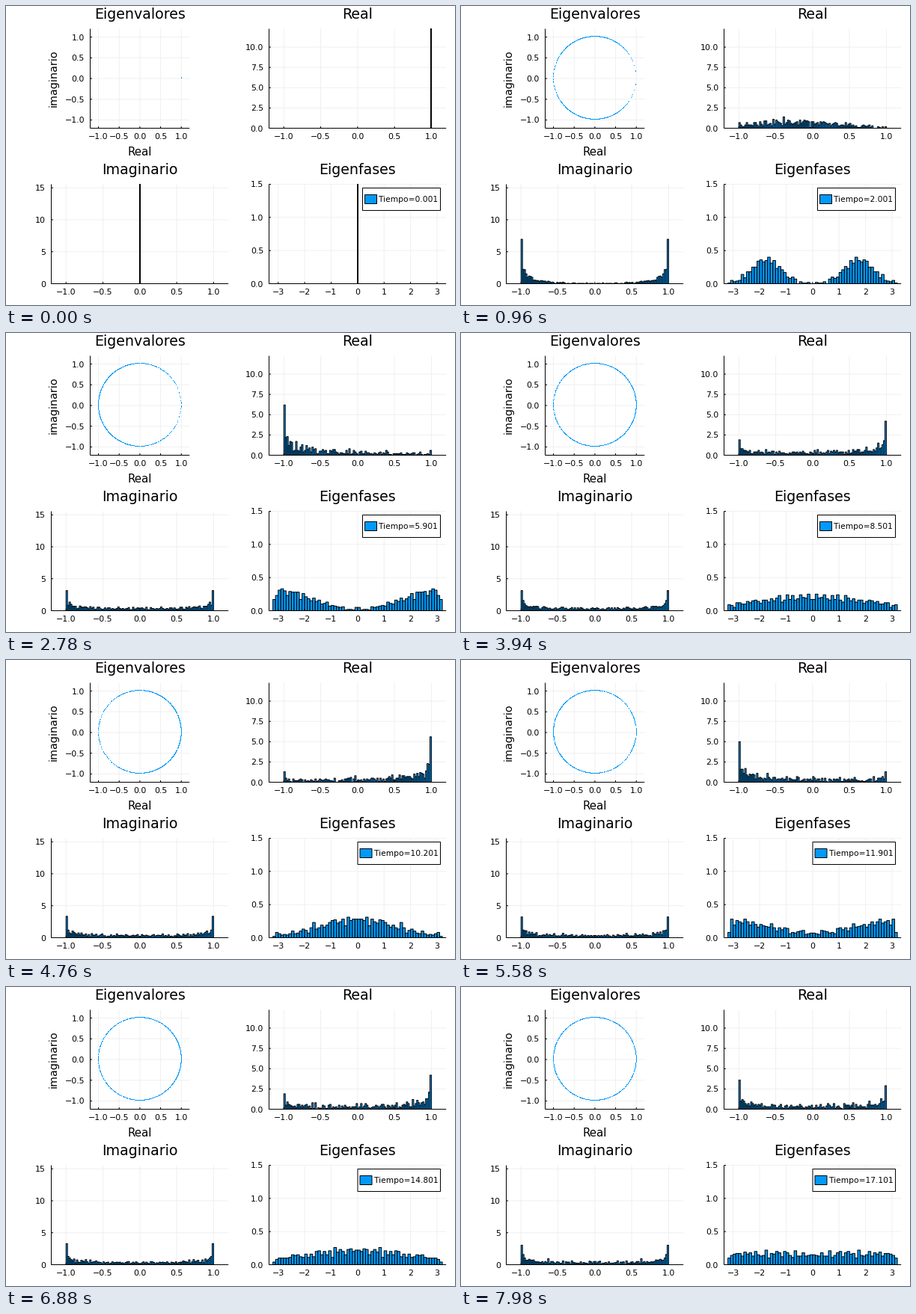
A matplotlib script that plays this animation: 600x400 px, repeating every 8000 ms.

```python
import numpy as np
import matplotlib.pyplot as plt
from matplotlib.animation import FuncAnimation
from matplotlib.collections import LineCollection, PolyCollection
from matplotlib.patches import Rectangle

W, H, DPI = 600, 400, 100
LOOP, TICK = 8000, 20
PX = 72 / DPI                      # one pixel in points
BLUE = "#009afa"
PAIRS, BINS, STEPS = 500, 100, 172

plt.rcParams["font.family"] = "DejaVu Sans"
fig = plt.figure(figsize=(W / DPI, H / DPI), dpi=DPI, facecolor="white")
ax = fig.add_axes([0, 0, 1, 1])
ax.set_xlim(0, W)
ax.set_ylim(H, 0)
ax.axis("off")


def label(x, y, s, size, **kw):
    return ax.text(x, y, s, fontsize=size * PX, va="baseline", **kw)


def lines(segments, color, z):
    ax.add_collection(LineCollection(segments, colors=color, linewidths=PX,
                                     snap=False, zorder=z))


def rect(x, y, w, h, color, z):
    return ax.add_patch(Rectangle((x, y), w, h, fc=color, ec="black", lw=PX,
                                  snap=False, zorder=z))


class Panel:
    """Axes box in pixels with its own data limits, ticks and title."""

    def __init__(self, title, box, xlim, ylim, xticks, yticks, fx, fy):
        self.box, self.xlim, self.ylim = box, xlim, ylim
        left, top, right, bottom = box
        tx, ty = self.x(np.array(xticks)), self.y(np.array(yticks))
        lines([[(x, top), (x, bottom)] for x in tx]
              + [[(left, y), (right, y)] for y in ty], "#f0f0f0", 1)
        lines([[(left, top), (left, bottom)], [(left, bottom), (right, bottom)]]
              + [[(x, bottom), (x, bottom - 2.5)] for x in tx]
              + [[(left, y), (left + 2.5, y)] for y in ty], "black", 4)
        label((left + right) / 2, top - 13.4, title, 19, ha="center")
        for v, x in zip(xticks, tx):
            label(x, bottom + 15, fx(v), 11, ha="center")
        for v, y in zip(yticks, ty):
            label(left - 7.5, y + 4, fy(v), 11, ha="right")

    def x(self, v):
        a, b = self.xlim
        return self.box[0] + (v - a) / (b - a) * (self.box[2] - self.box[0])

    def y(self, v):
        a, b = self.ylim
        return self.box[3] - (v - a) / (b - a) * (self.box[3] - self.box[1])

    def add_bars(self):
        left, top, right, bottom = self.box
        self.bars = PolyCollection([], facecolors=BLUE, edgecolors="black",
                                   linewidths=PX, snap=False, zorder=3)
        ax.add_collection(self.bars, autolim=False)
        self.bars.set_clip_path(Rectangle((left, bottom + 0.5), right - left,
                                          top - bottom - 1,
                                          transform=ax.transData))

    def set_hist(self, data):
        """Density histogram with a round bin width."""
        step = nice_step(np.ptp(data) / BINS)
        slot = np.floor(data / step)
        first = slot.min()
        n = np.bincount((slot - first).astype(int))
        k = np.flatnonzero(n)
        dens = np.minimum(n[k] / (len(data) * step), 3 * self.ylim[1])
        x0, x1 = self.x((first + k) * step), self.x((first + k + 1) * step)
        y0, y1 = np.full(len(k), self.box[3]), self.y(dens)
        self.bars.set_verts(np.stack([np.stack([x0, x0, x1, x1], 1),
                                      np.stack([y0, y1, y1, y0], 1)], 2))


def nice_step(r):
    base = 10.0 ** np.floor(np.log10(r))
    for m in (1, 2, 5):
        if r / base <= 1.1 * m:
            return m * base
    return 10 * base


def dec(v):
    return f"{v:.1f}".replace("-", "\u2212")


def whole(v):
    return f"{v:.0f}".replace("-", "\u2212")


unit = np.arange(-1, 1.1, 0.5)
circle = Panel("Eigenvalores", (112.5, 30.5, 245.3, 163.5), (-1.2, 1.2),
               (-1.2, 1.2), unit, unit, dec, dec)
real = Panel("Real", (351.5, 30.5, 588.2, 163.5), (-1.2, 1.2), (0, 12.26),
             unit, np.arange(0, 11, 2.5), dec, dec)
imag = Panel("Imaginario", (60.5, 238.5, 297.2, 371.5), (-1.2, 1.2),
             (0, 15.55), unit, range(0, 16, 5), dec, whole)
phase = Panel("Eigenfases", (351.5, 238.5, 588.2, 371.5), (-3.345, 3.345),
              (0, 1.5), range(-3, 4), np.arange(0, 1.6, 0.5), whole, dec)
for p in (real, imag, phase):
    p.add_bars()
label(178.9, 199.5, "Real", 15, ha="center")
label(67.5, 96.5, "imaginario", 14.4, ha="center", rotation=90,
      rotation_mode="anchor")
dots, = ax.plot([], [], ",", color=BLUE, zorder=3)

frame = rect(476.5, 243.5, 104, 30, "white", 5)
swatch = rect(479.5, 252.5, 16, 12, BLUE, 6)
legend = label(498, 262.5, "", 10.67, zorder=6)

# Centre and spread of the drifting phase cloud at a few times
key_t = [0, 2, 2.9, 5.9, 8.5, 11.9, 14.8, 17.1]
centre = [0, 1.75, 3.1, 3.9, 5.1, 8.6, 11.7, 14.2]
spread = [0, 0.55, 0.62, 1.0, 1.3, 1.35, 1.6, 1.8]

z_grid = np.linspace(-3.2, 3.2, 400)
z_cdf = np.cumsum(np.exp(-z_grid ** 2 / 2))
z_cdf /= z_cdf[-1]

rng = np.random.default_rng(7)
rate = rng.uniform(0.5, 2.5, PAIRS)
shift = rng.uniform(0, 2 * np.pi, PAIRS)


def phases(t):
    """Conjugate pairs of phases from a wrapped, slowly jittering Gaussian."""
    u = (np.arange(PAIRS) + 0.5 + 9 * np.sin(rate * t + shift)) / PAIRS
    z = np.interp(1 - np.abs(1 - np.abs(u)), z_cdf, z_grid)
    phi = np.interp(t, key_t, centre) + np.interp(t, key_t, spread) * z
    phi = (phi + np.pi) % (2 * np.pi) - np.pi
    return np.concatenate([-phi, phi])


# Every third step is held longer, for a short stretch every fourth
k = np.arange(STEPS)
held = np.where((k >= 20) & (k < 31), k % 4 == 0, k % 3 == 1)
starts = np.concatenate([[0], np.cumsum(np.where(held, 100, 20))[:-1]])


def update(i):
    step = np.searchsorted(starts, i * TICK, "right") - 1
    t = step / 10 + 0.001
    phi = phases(t)
    re, im = np.cos(phi), np.sin(phi)
    dots.set_data(circle.x(re) - 0.5, circle.y(im) - 0.5)
    real.set_hist(re)
    imag.set_hist(im)
    phase.set_hist(phi)

    dx = 6.5 if t >= 10 else 0     # room for one more digit
    legend.set_text(f"Tiempo={t:.3f}")
    legend.set_x(498 - dx)
    swatch.set_x(479.5 - dx)
    frame.set_x(476.5 - dx)
    frame.set_width(104 + dx)
    return dots, real.bars, imag.bars, phase.bars, frame, swatch, legend


anim = FuncAnimation(fig, update, frames=LOOP // TICK, interval=TICK,
                     repeat=True, repeat_delay=0)
plt.show()
```
